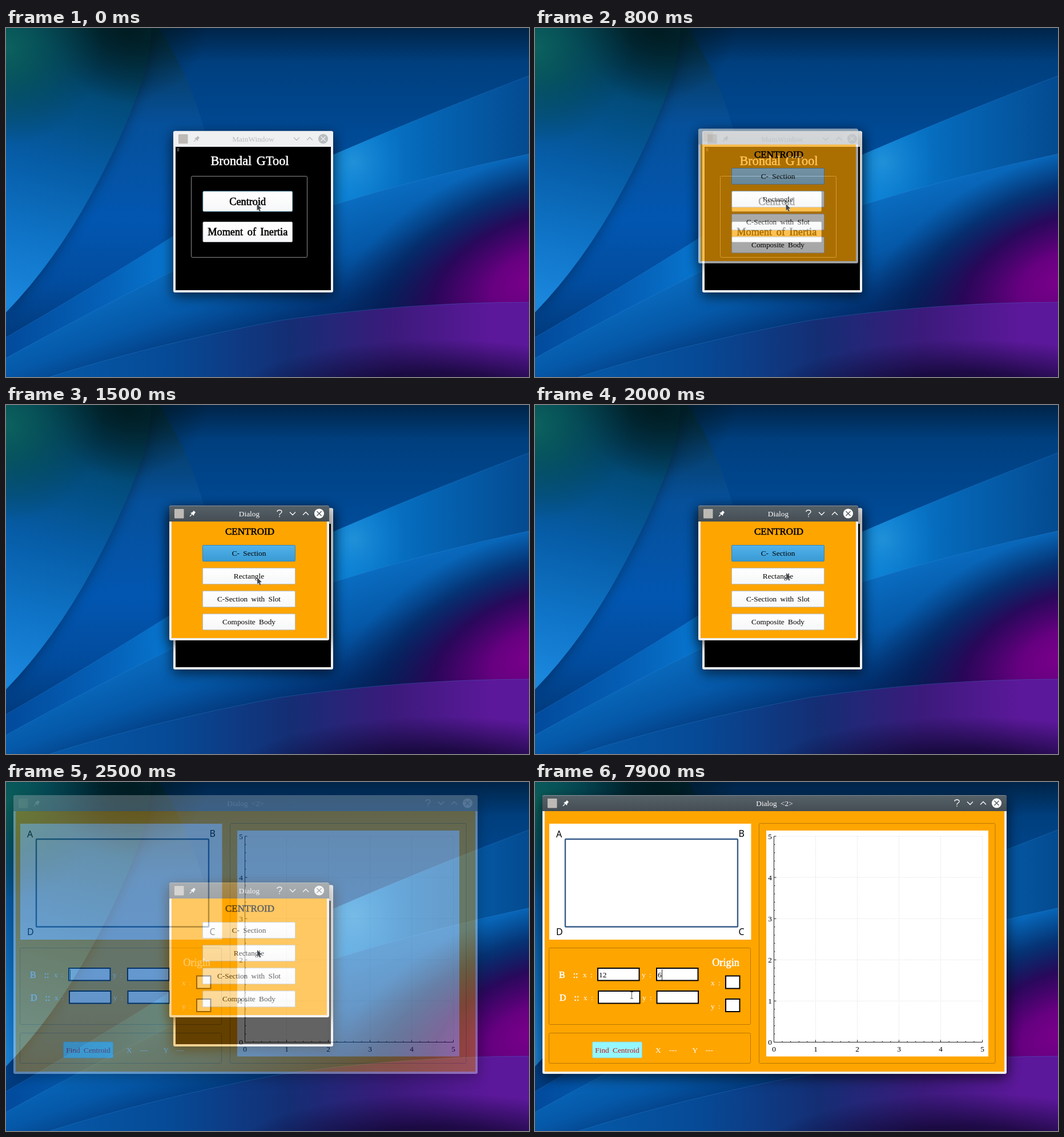
These frames come from a looping animation (916x611 px, 8 s). An HTML page:

```html
<!DOCTYPE html>
<html lang="en">
<head>
<meta charset="utf-8">
<title>Section tool</title>
<style>
html, body { margin: 0; width: 100%; height: 100%; overflow: hidden; background: #002448; }
svg { display: block; }
text { font: 13.33px "Liberation Serif", serif; word-spacing: 3px; }
.mid { text-anchor: middle; }
.end { text-anchor: end; }
.bold { stroke: currentColor; stroke-width: .6px; }
.sans { font: 16px "Noto Sans", sans-serif; }
.line { fill: none; }
</style>
</head>
<body>
<svg width="916" height="611" viewBox="0 0 916 611">
  <defs>
    <filter id="soft" x="-30%" y="-30%" width="160%" height="160%"><feGaussianBlur stdDeviation="11"/></filter>
    <linearGradient id="sky" x2="0" y2="1">
      <stop stop-color="#002448"/><stop offset=".1" stop-color="#003f7e"/><stop offset=".34" stop-color="#004b98"/>
    </linearGradient>
    <linearGradient id="arc" x2="0" y2="1">
      <stop stop-color="#02262f"/><stop offset=".13" stop-color="#063f6c"/><stop offset=".3" stop-color="#06509a"/>
      <stop offset=".6" stop-color="#0256b0"/><stop offset=".8" stop-color="#024c9e"/><stop offset="1" stop-color="#003675"/>
    </linearGradient>
    <linearGradient id="leaf" gradientUnits="userSpaceOnUse" x1="150" y1="0" x2="30" y2="480">
      <stop stop-color="#02303a"/><stop offset=".25" stop-color="#024c7c"/><stop offset=".5" stop-color="#065ca6"/>
      <stop offset=".8" stop-color="#1076ca"/><stop offset="1" stop-color="#1a86dc"/>
    </linearGradient>
    <linearGradient id="band1">
      <stop stop-color="#024a9c"/><stop offset=".2" stop-color="#0562b8"/><stop offset=".32" stop-color="#0876d0"/>
      <stop offset=".66" stop-color="#0a80d4"/><stop offset=".8" stop-color="#0566b6"/><stop offset="1" stop-color="#044a90"/>
    </linearGradient>
    <linearGradient id="band2" gradientUnits="userSpaceOnUse" x1="500" y1="340" x2="580" y2="563">
      <stop stop-color="#0a6cc0"/><stop offset=".35" stop-color="#0558a8"/>
      <stop offset=".7" stop-color="#023070"/><stop offset="1" stop-color="#061a4a"/>
    </linearGradient>
    <linearGradient id="band3">
      <stop stop-color="#0559a8"/><stop offset=".25" stop-color="#064a96"/><stop offset=".5" stop-color="#142e74"/>
      <stop offset=".72" stop-color="#3c1a7c"/><stop offset=".92" stop-color="#5c189a"/>
    </linearGradient>
    <radialGradient id="green" gradientUnits="userSpaceOnUse" cx="0" cy="35" r="170">
      <stop stop-color="#0c625e"/><stop offset=".3" stop-color="#08575a" stop-opacity=".85"/><stop offset="1" stop-color="#024050" stop-opacity="0"/>
    </radialGradient>
    <radialGradient id="night" gradientUnits="userSpaceOnUse" cx="215" cy="-10" r="140">
      <stop stop-color="#00161c" stop-opacity=".85"/><stop offset="1" stop-color="#00161c" stop-opacity="0"/>
    </radialGradient>
    <radialGradient id="glow" gradientUnits="userSpaceOnUse" cx="610" cy="235" r="90">
      <stop stop-color="#2a98da" stop-opacity=".7"/><stop offset="1" stop-color="#1080d4" stop-opacity="0"/>
    </radialGradient>
    <radialGradient id="purple" gradientUnits="userSpaceOnUse" cx="0" cy="0" r="1"
      gradientTransform="translate(930 440) rotate(-20) scale(380 215)">
      <stop stop-color="#7c008c"/><stop offset=".22" stop-color="#660080"/><stop offset=".5" stop-color="#2c0458" stop-opacity=".92"/>
      <stop offset=".75" stop-color="#061a52" stop-opacity=".6"/><stop offset="1" stop-color="#02285c" stop-opacity="0"/>
    </radialGradient>
    <radialGradient id="dusk" gradientUnits="userSpaceOnUse" cx="0" cy="0" r="1"
      gradientTransform="translate(760 660) scale(380 115)">
      <stop stop-color="#0a0420" stop-opacity=".95"/><stop offset=".5" stop-color="#0a0428" stop-opacity=".7"/><stop offset="1" stop-color="#0a0430" stop-opacity="0"/>
    </radialGradient>
    <linearGradient id="white" x2="0" y2="1"><stop stop-color="#fff"/><stop offset="1" stop-color="#f6f7f8"/></linearGradient>
    <linearGradient id="blue" x2="0" y2="1"><stop stop-color="#53b2ea"/><stop offset="1" stop-color="#399ad4"/></linearGradient>
    <linearGradient id="bar" x2="0" y2="1"><stop stop-color="#566168"/><stop offset="1" stop-color="#454d54"/></linearGradient>
    <path id="leafShape" d="M0 0H255Q250 60 238 95Q205 190 150 290Q85 410 0 498Z"/>
  </defs>

  <rect width="916" height="611" fill="url(#sky)"/>
  <path d="M0 0H268Q320 80 348 180Q372 290 372 340L0 560Z" fill="url(#arc)"/>
  <use href="#leafShape" filter="url(#soft)" opacity=".35"/>
  <use href="#leafShape" fill="url(#leaf)"/>
  <path d="M0 0H400V140H0Z" fill="url(#night)"/>
  <path d="M0 0H200V230H0Z" fill="url(#green)"/>
  <g stroke="#3a96e0" stroke-opacity=".35" stroke-width=".8">
    <path d="M-2 543Q150 455 292 365Q440 280 573 222Q740 150 918 83V613H-2Z" fill="url(#band1)"/>
    <path d="M573 222Q640 193 710 164V280L573 310Z" fill="url(#glow)" stroke="none"/>
    <path d="M-2 579Q150 495 292 426Q430 355 573 310Q740 258 918 220V613H-2Z" fill="url(#band2)"/>
    <path d="M540 321Q740 258 916 220V611H540Z" fill="url(#purple)" stroke="none"/>
    <path d="M73 612Q260 553 480 512Q700 480 918 480V613Z" fill="url(#band3)"/>
    <path d="M380 540H916V611H380Z" fill="url(#dusk)" stroke="none"/>
  </g>
  <g id="desk"></g>
</svg>
<script>
const ORANGE = '#ffa500';
const $ = id => document.getElementById(id);

const box = (x, y, w, h, attrs) => `<rect x="${x}" y="${y}" width="${w}" height="${h}" ${attrs}/>`;
const label = (x, y, str, cls = '', color = '#000', size = '') =>
  `<text x="${x}" y="${y}" class="${cls}" style="color:${color};fill:${color};${size && `font-size:${size}px`}">${str}</text>`;
const range = n => [...Array(n).keys()];

function head(x, y, w, title, active, help) {
  const ink = active ? '#fcfcfc' : '#b9bdc0';
  const cross = active ? '#4a535a' : '#eff0f1';
  const cy = y + 13.5, right = x + w;
  return `<path d="M${x} ${y + 27.5}V${y + 3}q0-3 3-3H${right - 3}q3 0 3 3V${y + 27.5}Z" fill="${active ? 'url(#bar)' : '#eff0f1'}"/>
    ${box(x + 9, y + 5.5, 16.5, 16.5, 'rx="1" fill="#bdbab6"')}
    <g transform="translate(${x + 41} ${cy})" fill="${ink}" stroke="${ink}" stroke-width="1.2">
      <path d="M-5 5L-1.5 1.5"/><path d="M-4-1L2 4L2.500 1L5-2L2-5L-1-2Z" stroke="none"/></g>
    <g class="line" stroke="${ink}" stroke-width="1.3">
      <path d="M${right - 69} ${cy - 2.5}l5 5l5-5M${right - 46} ${cy + 2.5}l5-5l5 5"/>
      ${help ? `<path d="M${right - 91} ${cy - 3}q0-3 4-3q4 0 4 3q0 2-3 3.500q-1 .5-1 2.500M${right - 87} ${cy + 4.5}v1.800"/>` : ''}
    </g>
    <circle cx="${right - 17.5}" cy="${cy}" r="8.600" fill="${ink}"/>
    <path d="M${right - 21.5} ${cy - 4}l8 8m0-8l-8 8" stroke="${cross}" stroke-width="1.2"/>
    ${label(x + w / 2, y + 18.5, title, 'mid', ink)}`;
}

function frame(id, x, y, w, h, title, fill, content, help = true) {
  return `<g id="${id}">
    ${box(x - 2, y + 5, w + 4, h + 2, 'rx="6" opacity=".62" filter="url(#soft)"')}
    ${box(x, y, w, h, 'rx="3" fill="#eff0f1"')}
    ${box(x + 4, y + 27.5, w - 8, h - 31.5, `fill="${fill}"`)}
    ${head(x, y, w, title, false, help)}
    <g id="${id}Head">${head(x, y, w, title, true, help)}</g>
    ${content}</g>`;
}

function button(x, y, w, h, text, glowId, cls = '', size = '', edge = '#b4bcc2') {
  const attrs = (fill, stroke) => `rx="1.500" fill="${fill}" stroke="${stroke}"`;
  return box(x, y, w, h, attrs('url(#white)', edge)) +
    (glowId ? `<g id="${glowId}">${box(x, y, w, h, attrs('url(#blue)', '#3486b8'))}</g>` : '') +
    label(x + w / 2, y + h / 2 + (size ? 6 : 4.500), text, 'mid ' + cls, '#000', size);
}

const field = (x, y, w, h) => box(x + 1, y + 1, w - 2, h - 2, 'fill="#fff" stroke="#000" stroke-width="2"');
const group = (x, y, w, h) => box(x + .5, y + .5, w, h, 'rx="2" fill="none" stroke="#b87804"');

function plot() {
  const x0 = 418.5, y0 = 455.5, dx = 73, dy = 72.1;
  const grid = range(6).map(i => `M${x0 + i * dx} 95V${y0}M${x0} ${y0 - i * dy}H783.5`).join('');
  const ticks = range(26).map(i => {
    const len = i % 5 ? 2 : 4;
    return `M${x0 + i * dx / 5} ${y0}v${-len}M${x0} ${y0 - i * dy / 5}h${len}`;
  }).join('');
  return box(405, 85, 389, 395.5, 'fill="#fff"') +
    `<path d="${grid}" class="line" stroke="#d2d2d2" stroke-dasharray="1 2"/>
     <path d="M${x0} 95V${y0}H783.5${ticks}" class="line" stroke="#222"/>` +
    range(6).map(i => label(x0 + i * dx, 472, i, 'mid') + label(415, y0 + 4.5 - i * dy, i, 'end')).join('');
}

const mainWindow = frame('main', 293, 180.5, 280, 282.5, 'MainWindow', '#000',
  `<path d="M300.500 210v6m2-6v6" stroke="#777"/>` +
  label(427, 240, 'Brondal GTool', 'mid bold', '#fff', 22.3) +
  box(324.5, 259.5, 203, 142, 'rx="2" fill="none" stroke="#8a8c8e"') +
  button(345, 286, 156.5, 35, 'Centroid', 'press', 'bold', 18.3, '#8cc4e0') +
  button(345, 339.5, 156.5, 35, 'Moment of Inertia', '', 'bold', 18.3), false);

const chooser = frame('dialog', 286, 176.5, 280, 235.5, 'Dialog', ORANGE,
  label(427, 227, 'CENTROID', 'mid bold', '#000', 17) +
  ['C- Section', 'Rectangle', 'C-Section with Slot', 'Composite Body']
    .map((name, i) => button(344.5, 245.5 + i * 40.1, 162, 28, name, ['section', 'rectangle'][i])).join(''));

const coords = (name, dx, y) =>
  label(42 + dx, y + 17.5, `${name} &nbsp;::`, 'bold', '#fff', 16) +
  label(84 + dx, y + 16.5, 'x :', '', '#fff') + field(109 + dx, y, 74.5, 23.5) +
  label(187 + dx, y + 16.5, 'y :', '', '#fff') + field(212 + dx / 2, y, 74.5, 23.5);

const worksheet = frame('sheet', 13, 23.5, 813, 487.5, 'Dialog &lt;2>', ORANGE,
  box(25, 73, 353.5, 203, 'fill="#fff"') +
  box(53, 100, 302, 153.5, 'rx="1" fill="none" stroke="#385d8a" stroke-width="2.400"') +
  label(37, 97, 'A', 'sans') + label(356.5, 96, 'B', 'sans') +
  label(356.5, 268, 'C', 'sans') + label(37, 268, 'D', 'sans') +
  group(24, 290, 353, 134) + group(24, 439, 353, 53) + group(392, 72, 413.5, 420) +
  coords('B', 0, 325) + coords('D', 1, 365) +
  label(334, 322, 'Origin', 'mid bold', '#fff', 18.3) +
  label(308, 355.5, 'x :', '', '#fff') + field(333, 338.5, 26.5, 24) +
  label(308, 396.5, 'y :', '', '#fff') + field(333, 379, 26.5, 24) +
  box(100.5, 455, 87, 28, 'rx="1.500" fill="#93f7ff" stroke="#a8c8a8"') +
  label(144, 474, 'Find Centroid', 'mid', '#c81414') +
  label(211, 474, 'X', '', '#fff') + label(235, 474, '---', '', '#fff') +
  label(275.5, 474, 'Y', '', '#fff') + label(298.5, 474, '---', '', '#fff') +
  plot() +
  `<g id="twelve">${label(112, 342, '12')}</g><g id="six">${label(215, 342, '6')}</g>
   <path id="caret" d="M.5 328v19" stroke="#222"/>`);

$('desk').innerHTML = mainWindow + chooser + worksheet +
  `<path id="arrow" d="M.5 0V11.500L3 9.500L4.800 13.500L7 12.500L5.200 8.500L8.500 8Z" fill="#41474b" stroke="#ddd" stroke-opacity=".45" stroke-width=".7"/>
   <path id="beam" d="M-2-5.500H3M.5-5.500V6M-2 6H3" class="line" stroke="#555"/>`;

// Opacities and positions; each step overrides what came before it.
const STEPS = [
  [0, { main: 1, mainHead: 0, press: 0, dialog: 0, dialogHead: 0, section: 0, rectangle: 0, sheet: 0, sheetHead: 0,
        twelve: 0, six: 0, caret: [112, 0], arrow: [439, 308], beam: null }],
  [600, { press: .6 }],
  [700, { press: 0, dialog: .33, dialogHead: .05, section: .2 }],
  [800, { dialog: .67, dialogHead: .25, section: .48 }],
  [900, { dialog: .92, dialogHead: .7, section: .8 }],
  [1000, { dialog: 1, dialogHead: 1, section: 1 }],
  [1500, { arrow: [439.5, 302] }],
  [1600, { arrow: [439.5, 296] }],
  [1700, { arrow: [439.5, 290] }],
  [1900, { arrow: [439.5, 292] }],
  [2000, { arrow: [439.5, 294] }],
  [2300, { section: .3, rectangle: .4 }],
  [2400, { section: 0, rectangle: .6 }],
  [2500, { rectangle: 0, dialogHead: .82, sheet: .39, sheetHead: .5 }],
  [6700, { dialogHead: 0, sheet: 1, sheetHead: 1, twelve: 1, caret: [215, 0], arrow: null, beam: [241.5, 334] }],
  [7100, { beam: [228, 342] }],
  [7200, { beam: null, arrow: [207, 352] }],
  [7400, { arrow: [184, 366] }],
  [7700, { arrow: null, beam: [169, 373], six: 1, caret: null }],
  [7900, { caret: [222, 0] }],
];
const LOOP = 8000;

function apply(id, value) {
  const el = $(id);
  const shown = Array.isArray(value) || value > 0;
  el.setAttribute('visibility', shown ? 'visible' : 'hidden');
  if (Array.isArray(value)) el.setAttribute('transform', `translate(${value})`);
  else el.setAttribute('opacity', value || 0);
  if (Array.isArray(value)) el.setAttribute('opacity', 1);
}

const start = performance.now();
let current = -1;
function draw(now) {
  const t = Math.max(0, now - start) % LOOP;
  const past = STEPS.filter(([at]) => at <= t);
  if (past.length !== current) {
    current = past.length;
    const state = Object.assign({}, ...past.map(([, change]) => change));
    for (const id in state) apply(id, state[id]);
  }
  requestAnimationFrame(draw);
}
draw(start);
</script>
</body>
</html>
```
